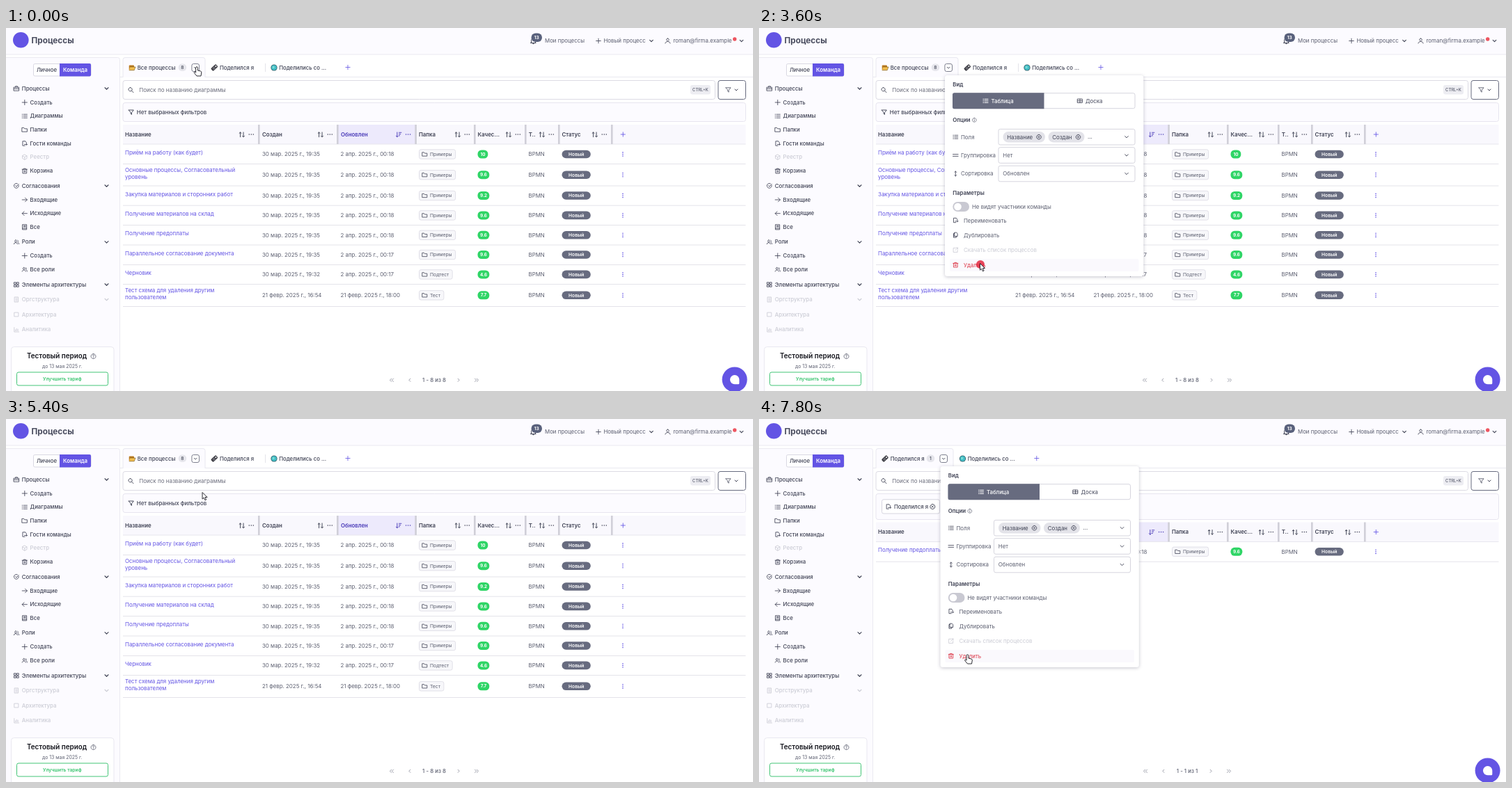
An HTML page with a canvas that plays this animation: 1073 px wide and 522 px high, repeating every 8000 ms.

```html
<!DOCTYPE html>
<html lang="ru">
<head>
<meta charset="utf-8">
<title>Процессы</title>
<style>
html, body { margin: 0; width: 100%; height: 100%; overflow: hidden; background: #fff; }
canvas { display: block; width: 1073px; height: 522px; }
</style>
</head>
<body>
<canvas id="stage"></canvas>
<script>
const W = 1073, H = 522, LOOP = 8000, STEP = 200;
const canvas = document.getElementById('stage');
const ctx = canvas.getContext('2d');
const dpr = window.devicePixelRatio || 1;
canvas.width = W * dpr;
canvas.height = H * dpr;

const INK = '#3f4254', GREY = '#5c5f70', PURPLE = '#6354e4', OFF = '#cbccd5';
const LINE = '#e4e3ea', PALE = '#fcfbff', SLATE = '#676b7f', RED = '#dc3545', GREEN = '#2fd566';

// Icons on a 24 unit grid
const RING = 'M12 2a10 10 0 1 0 .1 0';
const ICONS = {
  down: 'M4 8l8 8 8-8', prev: 'M15 5l-7 7 7 7', next: 'M9 5l7 7-7 7',
  first: 'M11 5l-7 7 7 7M20 5l-7 7 7 7', last: 'M4 5l7 7-7 7M13 5l7 7-7 7',
  plus: 'M12 2v20M2 12h20',
  list: 'M8 5h14M8 12h14M8 19h14M2 5h2M2 12h2M2 19h2',
  folder: 'M2 4h7l3 4h10v12H2z',
  guest: 'M14 3H4v18h9M14 3l5 5v3M11 16h11l-3-3m3 3l-3 3',
  box: 'M12 2l9 5v10l-9 5-9-5V7zM3 7l9 5 9-5M12 12v10',
  trash: 'M2 6h20M8 6V3h8v3M4 6v16h16V6M10 11v6M14 11v6',
  bag: 'M2 7h20v14H2zM8 7V3h8v4M2 13h20',
  check: 'M21 10a9.5 9.5 0 1 1-5-7M8 11l4 4 9-10',
  right: 'M2 12h20M14 4l8 8-8 8', left: 'M22 12H2M10 4l-8 8 8 8',
  book: 'M4 2h16v20H4zM8 7h8M8 11h8M4 17h16',
  people: 'M9 4a4 4 0 1 0 .1 0M2 20c0-8 14-8 14 0M17 5a4 4 0 0 1 0 7M19 14c2 1 3 3 3 6',
  grid: 'M3 3h7v7H3zM14 3h7v7h-7zM3 14h7v7H3zM14 14h7v7h-7z',
  org: 'M5 2h14v20H5zM9 7h6M9 12h6M9 17h6',
  square: 'M4 4h16v16H4z',
  chart: 'M3 3v18h19M8 17v-5M13 17V8M18 17v-7',
  search: 'M10 3a7 7 0 1 0 .1 0M15 15l7 7',
  funnel: 'M2 3h20l-8 10v8l-4-3v-5z',
  sort: 'M6 21V3M2 7l4-4 4 4M18 3v18M14 17l4 4 4-4',
  desc: 'M6 3v18M2 17l4 4 4-4M13 4h9M13 10h6M13 16h3',
  close: RING + 'M8 8l8 8M16 8l-8 8',
  info: RING + 'M12 11v6M12 7v1',
  help: RING + 'M9 9c0-4 6-4 6 0 0 2-3 2-3 5M12 17v1',
  bell: 'M5 18V10a7 7 0 0 1 14 0v8l2 1H3zM10 22h4',
  user: 'M12 2a5 5 0 1 0 .1 0M2 22c0-10 20-10 20 0',
  copy: 'M8 2h8l4 4v11H8zM8 6H4v16h11v-5',
  send: 'M12 4H3v17h17v-8M15 3h6v6M21 3l-10 10',
  equals: 'M1 8h22M1 16h22',
  height: 'M12 2v20M8 6l4-4 4 4M8 18l4 4 4-4',
  table: 'M2 4h20v16H2zM12 4v16M2 12h20'
};
for (const k in ICONS) ICONS[k] = new Path2D(ICONS[k]);
const HAND = new Path2D('M-1.4 1.2a1.4 1.4 0 0 1 2.8 0V5l4 1q1.6.5 1.4 2L6 13H0L-3.6 8.6q-.8-1.9 1-1.5l1.2 1z');
const ARROW = new Path2D('M0 0V9.6L2.2 7.6 3.9 11.3 5.6 10.5 4 7H7z');

function txt(s, x, y, color = INK, size = 7.9, weight = 400, align = 'left') {
  ctx.font = `${weight} ${size}px Inter, "Noto Sans", sans-serif`;
  ctx.textBaseline = 'middle';
  ctx.textAlign = align;
  ctx.fillStyle = color;
  ctx.fillText(s, x, y);
}

function icon(name, x, y, size = 9, color = INK, lw = 0.85) {
  ctx.save();
  ctx.translate(x - size / 2, y - size / 2);
  ctx.scale(size / 24, size / 24);
  ctx.lineWidth = lw * 24 / size;
  ctx.lineJoin = ctx.lineCap = 'round';
  ctx.strokeStyle = color;
  ctx.stroke(ICONS[name]);
  ctx.restore();
}

function box(x1, y1, x2, y2, r, fill, stroke, lw = 1) {
  ctx.beginPath();
  ctx.roundRect(x1, y1, x2 - x1, y2 - y1, r);
  if (fill) { ctx.fillStyle = fill; ctx.fill(); }
  if (stroke) { ctx.strokeStyle = stroke; ctx.lineWidth = lw; ctx.stroke(); }
}

function dot(x, y, r, fill) {
  ctx.beginPath();
  ctx.arc(x, y, r, 0, 7);
  ctx.fillStyle = fill;
  ctx.fill();
}

function dots(x, y, color, dx, dy) {
  for (let i = -1; i < 2; i++) dot(x + i * dx, y + i * dy, 0.8, color);
}

function hline(x1, x2, y, color = LINE) {
  ctx.fillStyle = color;
  ctx.fillRect(x1, y, x2 - x1, 1);
}

function header() {
  box(0, 0, W, 38, 0, PALE);
  hline(0, W, 37.5, '#ebeaf1');
  dot(21.3, 17.3, 11.3, PURPLE);
  txt('Процессы', 36.5, 18.5, '#494c5e', 11.75, 700);
  icon('bell', 757.5, 18.5, 10, INK, 1);
  box(754.5, 7.5, 770, 20, 6.2, '#59617c');
  txt('13', 762.3, 14, '#fff', 6.5, 700, 'center');
  txt('Мои процессы', 774, 18.5, GREY);
  icon('plus', 851, 18.5, 8, INK);
  txt('Новый процесс', 858.5, 18.5, GREY);
  icon('down', 927, 18.5, 7, INK, 1.1);
  icon('user', 950.5, 18.5, 8.5, INK);
  txt('roman@firma.example', 958.5, 18.5, GREY);
  dot(1046.7, 16, 2.7, '#ee5560');
  icon('down', 1056.5, 18.5, 7, INK, 1.1);
}

// icon, label, y, kind: 1 section, 0 item, 2 plain; disabled
const NAV = [
  ['bag', 'Процессы', 87, 1], ['plus', 'Создать', 107, 0], ['list', 'Диаграммы', 126.7, 0],
  ['folder', 'Папки', 146.3, 0], ['guest', 'Гости команды', 166, 0], ['box', 'Реестр', 185.7, 0, 1],
  ['trash', 'Корзина', 205.4, 0], ['check', 'Согласования', 227, 1], ['right', 'Входящие', 247, 0],
  ['left', 'Исходящие', 266.7, 0], ['book', 'Все', 286.3, 0], ['people', 'Роли', 307.8, 1],
  ['plus', 'Создать', 327.5, 0], ['people', 'Все роли', 347.2, 0],
  ['grid', 'Элементы архитектуры', 369, 1], ['org', 'Оргструктура', 390.5, 1, 1],
  ['square', 'Архитектура', 412, 2, 1], ['chart', 'Аналитика', 433.8, 2, 1]
];

function sidebar() {
  box(-4, 42.5, 163.5, H + 5, 3, PALE, '#ebeaf1');
  box(39.5, 51.5, 122, 69, 2, '#fff', '#d9d8e2');
  box(77, 51, 122, 69.5, [0, 2, 2, 0], PURPLE);
  txt('Личное', 58.5, 60.3, INK, 7.85, 500, 'center');
  txt('Команда', 99.5, 60.3, '#fff', 7.85, 600, 'center');
  for (const [ic, label, y, kind, off] of NAV) {
    const c = off ? OFF : INK, x = kind ? 15 : 26.8;
    icon(ic, x, y, 8.6, c);
    txt(label, x + 7.8, y + 0.3, c, 7.85, 500);
    if (kind === 1) icon('down', 144.5, y, 7.5, c, 1.1);
  }
  box(7.5, 458.5, 155, H + 8, 4, '#fff', '#e9e8f0');
  txt('Тестовый период', 30, 472.5, '#15161d', 9.85, 600);
  icon('help', 125.5, 472, 8.5, GREY, 0.8);
  txt('до 13 мая 2025 г.', 80.8, 486.7, GREY, 6.9, 400, 'center');
  box(15.5, 495, 146.5, 514, 2.5, '#fff', '#42c576');
  txt('Улучшить тариф', 80.8, 504.7, '#38c46e', 6.75, 600, 'center');
}

function tabIcon(kind, x, y) {
  if (kind === 'folder') {
    box(x - 4.3, y - 3.6, x + 3, y + 3.5, 1, '#b97b22');
    ctx.beginPath();
    ctx.moveTo(x - 2.6, y - 1); ctx.lineTo(x + 5, y - 1);
    ctx.lineTo(x + 3.2, y + 3.8); ctx.lineTo(x - 4.3, y + 3.8);
    ctx.fillStyle = '#f1bd4f';
    ctx.fill();
    ctx.lineWidth = 0.5; ctx.strokeStyle = '#5e430f'; ctx.stroke();
  } else if (kind === 'tag') {
    ctx.save();
    ctx.translate(x, y);
    ctx.rotate(-0.75);
    box(-4.8, -2.5, 4.8, 2.5, 1.3, '#3b3b42');
    dot(2.9, 0, 1, '#fff');
    ctx.fillStyle = '#a5a5ad';
    ctx.fillRect(-3, -1, 4, 0.7);
    ctx.fillRect(-3, 0.6, 4, 0.7);
    ctx.restore();
  } else {
    dot(x, y, 4.6, '#2c5560');
    dot(x, y, 3.8, '#43bfc6');
    dot(x - 0.8, y - 0.6, 1.6, '#7cdbd5');
  }
}

function activeTab(kind, label, count, right) {
  box(168, 42.5, right, 74, 3, PALE, '#e9e8f0');
  ctx.fillStyle = '#fff';
  ctx.fillRect(165, 71, right - 160, 4);
  const cx = right - 13.8;
  tabIcon(kind, 181, 57);
  txt(label, 188.7, 57.2, INK, 7.8, 500);
  box(cx - 24.5, 51.5, cx - 13, 62, 5, '#e6e6ec');
  txt(count, cx - 18.8, 57.1, INK, 6.7, 500, 'center');
  box(cx - 5.3, 51.5, cx + 5.3, 62.5, 2.5, '#fff', '#6f7182', 0.9);
  icon('down', cx, 57.2, 5.5, INK, 0.9);
}

function tabs(single) {
  hline(164, W, 70, '#e9e8f0');
  if (single) {
    activeTab('tag', 'Поделился я', '1', 279);
  } else {
    activeTab('folder', 'Все процессы', '8', 286);
    tabIcon('tag', 299.3, 57);
    txt('Поделился я', 307, 57.2, INK, 7.8, 500);
    ctx.fillStyle = LINE;
    ctx.fillRect(372, 51, 1, 12);
  }
  const x = single ? 292.5 : 385;
  tabIcon('globe', x, 57);
  txt('Поделились со ...', x + 7.3, 57.2, INK, 7.8, 500);
  icon('plus', single ? 398.8 : 491, 56.5, 7.5, PURPLE, 0.8);
}

function filters(single) {
  box(168, 75.5, 1018.5, 102.5, 3, '#fff', '#dcdbe4');
  icon('search', 179.3, 89, 9, INK, 0.9);
  txt('Поиск по названию диаграммы', 191.3, 89.5, '#6b6d7c', 8);
  box(983, 82, 1012, 95.5, 3, '#ededf2');
  txt('CTRL+K', 997.5, 89, GREY, 5.9, 500, 'center');
  box(1023, 75.5, 1062.5, 102.5, 3, '#fff', SLATE);
  icon('funnel', 1037.5, 89, 8.5, GREY, 0.9);
  icon('down', 1049, 89, 6, INK, 1);
  box(168, 107.5, 1062.5, single ? 144.5 : 134.5, 3, PALE, '#e7e5ef');
  if (single) {
    box(176.5, 115.8, 259.5, 136, 2.5, '#fff', '#d6d5df');
    icon('guest', 186, 126, 8.5);
    txt('Поделился я', 194, 126.2, INK, 7.8, 500);
    icon('close', 249.3, 126, 8.5, INK, 0.9);
  } else {
    icon('funnel', 179.8, 121.2, 8.5, INK, 0.95);
    txt('Нет выбранных фильтров', 187.8, 121.7, INK, 7.9, 500);
  }
}

const COLS = [['Название', 171, 363], ['Создан', 368, 476], ['Обновлен', 481, 588.3],
  ['Папка', 593, 673], ['Качес...', 677.5, 746], ['Т..', 750.7, 794], ['Статус', 798.5, 870]];

// title lines, centre, bottom, created, updated, folder, score
const MAR = '30 мар. 2025 г., 19:35', APR = '2 апр. 2025 г., 00:18', APR2 = '2 апр. 2025 г., 00:17';
const ROWS = [
  [['Приём на работу (как будет)'], 181.5, 195, MAR, APR, 'Примеры', '10'],
  [['Основные процессы, Согласовательный', 'уровень'], 211.2, 226.5, MAR, APR, 'Примеры', '9.6'],
  [['Закупка материалов и сторонних работ'], 241, 254.7, MAR, APR, 'Примеры', '9.2'],
  [['Получение материалов на склад'], 269.4, 283, MAR, APR, 'Примеры', '9.6'],
  [['Получение предоплаты'], 297.8, 311.5, MAR, APR, 'Примеры', '9.6'],
  [['Параллельное согласование документа'], 326, 340, MAR, APR2, 'Примеры', '9.6'],
  [['Черновик'], 354.4, 368, '30 мар. 2025 г., 19:32', APR2, 'Подтест', '4.6'],
  [['Тест схема для удаления другим', 'пользователем'], 384.3, 400, '21 февр. 2025 г., 16:54', '21 февр. 2025 г., 18:00', 'Тест', '7.7']
];

function row([lines, y, bottom, made, updated, dir, score]) {
  const top = lines.length > 1 ? y - 6.3 : y - 1.8;
  lines.forEach((s, i) => txt(s, 171, top + i * 9.7, PURPLE, 7.93));
  txt(made, 368, y + 0.4, GREY);
  txt(updated, 480.5, y + 0.4, GREY);
  ctx.font = '400 6.8px Inter, "Noto Sans", sans-serif';
  box(593.5, y - 6.7, 614 + ctx.measureText(dir).width, y + 6.7, 2.5, '#f7f7fa', '#e1e0e8');
  icon('folder', 601.5, y, 8, INK, 0.8);
  txt(dir, 609, y + 0.4, GREY, 6.8);
  box(677.5, y - 6, score === '10' ? 692.3 : 694.3, y + 6, 5.5, GREEN);
  txt(score, score === '10' ? 685 : 686, y + 0.3, '#fff', 6.3, 700, 'center');
  txt('BPMN', 750.5, y + 0.4, GREY);
  box(798.5, y - 5.8, 839.8, y + 5.8, 5.8, SLATE);
  txt('Новый', 819.2, y + 0.3, '#fff', 6.7, 600, 'center');
  dots(886, y, PURPLE, 0, 2.6);
  hline(168, 1062.5, bottom);
}

function table(single) {
  const top = single ? 148.5 : 139, mid = top + 14;
  box(168, top, 1062.5, top + 28, 0, '#f9f8fd');
  box(477, top, 588, top + 28, 0, '#edeafc');
  hline(168, 1062.5, top + 27.5, '#e8e7ee');
  COLS.forEach(([label, x, end], i) => {
    const hot = i === 2, c = hot ? '#4a3bb8' : INK;
    txt(label, x, mid + 0.3, c, 7.85, 600);
    icon(hot ? 'desc' : 'sort', end - 24.2, mid + 0.3, 9, c, 0.95);
    dots(end - 10.7, mid, c, 3, 0);
    ctx.fillStyle = '#d0cfd8';
    ctx.fillRect(end - 1, top, 2.6, 28);
  });
  icon('plus', 886.3, mid, 7.5, PURPLE, 0.85);
  if (single) {
    const r = ROWS[4].slice();
    r[1] = 190.8;
    r[2] = 204.7;
    row(r);
  } else ROWS.forEach(row);
  const g = '#8b8d9b', d = single ? 1 : 0;
  icon('first', 554 + d, 506.3, 7.5, g);
  icon('prev', 580 + d, 506.3, 7, g);
  txt(single ? '1 - 1 из 1' : '1 - 8 из 8', 615, 506.5, GREY, 7.85, 500, 'center');
  icon('next', 650 - d, 506.3, 7, g);
  icon('last', 676 - d, 506.3, 7.5, g);
}

function menu(dx, hoverY) {
  ctx.save();
  ctx.translate(dx, 0);
  ctx.shadowColor = 'rgba(50,45,80,.28)';
  ctx.shadowBlur = 5;
  ctx.shadowOffsetY = 1;
  box(267, 68, 552.3, 357, 3.5, '#fff');
  ctx.shadowColor = 'transparent';
  txt('Вид', 278.3, 81.3, INK, 7.8, 600);
  box(278.5, 93.7, 540, 115.7, 2.5, '#fff', '#d6d5de');
  box(278, 93.2, 409.5, 116.2, [2.5, 0, 0, 2.5], SLATE);
  icon('list', 325.5, 104.8, 8.5, '#fff', 1);
  txt('Таблица', 333.5, 105.3, '#fff', 7.8, 500);
  icon('table', 461, 104.8, 8, INK);
  txt('Доска', 469, 105.3, GREY, 7.8, 500);
  txt('Опции', 278.3, 133, INK, 7.8, 600);
  icon('info', 309.3, 132.3, 7, GREY, 0.7);
  [['list', 'Поля', 156.7, ''], ['equals', 'Группировка', 183, 'Нет'], ['height', 'Сортировка', 209.5, 'Обновлен']]
    .forEach(([ic, label, y, value]) => {
      icon(ic, 282.3, y, 8.3);
      txt(label, 290, y + 0.5, GREY);
      box(344, y - 11.3, 540, y + 11.3, 2.5, '#fff', '#d6d5de');
      txt(value, 350.3, y + 0.5, GREY);
      icon('down', 528, y, 7, INK, 0.95);
    });
  [['Название', 350.5, 411], ['Создан', 415.5, 467.5]].forEach(([label, x, end]) => {
    box(x, 149, end, 164.5, 7.7, '#e3e3e9');
    txt(label, x + 5.7, 157.2, INK);
    icon('close', end - 9, 156.7, 8, INK, 0.85);
  });
  txt('...', 472, 156.7, INK);
  txt('Параметры', 278.3, 237.8, INK, 7.8, 600);
  box(278.3, 250, 302, 264, 7, '#c9c9d2');
  dot(285.5, 257, 5.3, '#fff');
  txt('Не видят участники команды', 306, 257.4, GREY);
  [['guest', 'Переименовать', 277, GREY], ['copy', 'Дублировать', 298.2, GREY],
    ['send', 'Скачать список процессов', 319.7, OFF], ['trash', 'Удалить', 341, RED]]
    .forEach(([ic, label, y, c]) => {
      if (Math.abs(hoverY + 3 - y) < 9 && c !== OFF) box(274, y - 9, 545.5, y + 9, 2, '#faf9fd');
      icon(ic, 282.3, y - 0.5, 8.5, c === GREY ? INK : c);
      txt(label, 294, y + 0.2, c);
    });
  ctx.restore();
}

function veil() {
  ctx.filter = `blur(${1.6 * dpr}px)`;
  ctx.drawImage(canvas, 0, 0, W, H);
  ctx.filter = 'none';
  box(0, 0, W, H, 0, 'rgba(36,34,37,.7)');
  box(367.3, -20, 704.7, 34.5, 3, '#97949a');
  box(579.5, -8, 631, 18.5, 2.5, null, '#65656f');
  txt('Отмена', 605, 8, '#55565f', 7.85, 500, 'center');
  box(639, -8, 692.5, 18.8, 2.5, '#9c4450');
  txt('Удалить', 665.7, 8, '#ddd0d4', 7.85, 500, 'center');
}

function chat() {
  dot(1046.6, 505.5, 18, PURPLE);
  box(1040, 499, 1053.3, 512.3, [6.6, 6.6, 1.5, 6.6], '#fff');
}

const PATH = [[0, 274, 56], [1000, 274, 56], [2000, 317.5, 338.5], [3800, 317.5, 338.5],
  [4000, 326, 206], [4400, 326, 206], [6000, 261.7, 59], [6800, 261.7, 59], [7600, 299.5, 339], [LOOP, 299.5, 339]];

function pointer(t) {
  const i = PATH.findIndex(p => p[0] > t);
  const [t0, x0, y0] = PATH[i - 1], [t1, x1, y1] = PATH[i];
  const p = (t - t0) / (t1 - t0), e = p * p * (3 - 2 * p);
  return [x0 + (x1 - x0) * e, y0 + (y1 - y0) * e];
}

function draw(t) {
  const single = t >= 6000, dark = t === 3800, click = t === 3600;
  const open = single ? t >= 6600 : t >= 400 && t < 3800;
  const [x, y] = pointer(t);
  ctx.setTransform(dpr, 0, 0, dpr, 0, 0);
  box(0, 0, W, H, 0, '#fff');
  header();
  sidebar();
  tabs(single);
  filters(single);
  table(single);
  if (open) menu(single ? -6.5 : 0, y);
  if (dark) {
    ctx.globalAlpha = 0.25;
    menu(0, 0);
    ctx.globalAlpha = 1;
    veil();
  }
  // The chat button is missing while the page reloads
  if (single || t < 4000) chat();
  if (click) dot(318, 340, 6, 'rgba(226,40,62,.85)');
  if (dark) dot(318, 339.7, 14.5, 'rgba(162,45,56,.57)');
  const hand = !click && (y < 66 || open && y > 266);
  ctx.save();
  ctx.translate(x, y);
  ctx.lineWidth = 1;
  ctx.lineJoin = 'round';
  ctx.fillStyle = '#fff';
  ctx.strokeStyle = '#2c2c33';
  ctx.fill(hand ? HAND : ARROW);
  ctx.stroke(hand ? HAND : ARROW);
  ctx.restore();
}

const start = performance.now();
let shown = -1;
function tick() {
  const t = Math.floor((performance.now() - start) % LOOP / STEP) * STEP;
  if (t !== shown) draw(shown = t);
  requestAnimationFrame(tick);
}
tick();
</script>
</body>
</html>
```
